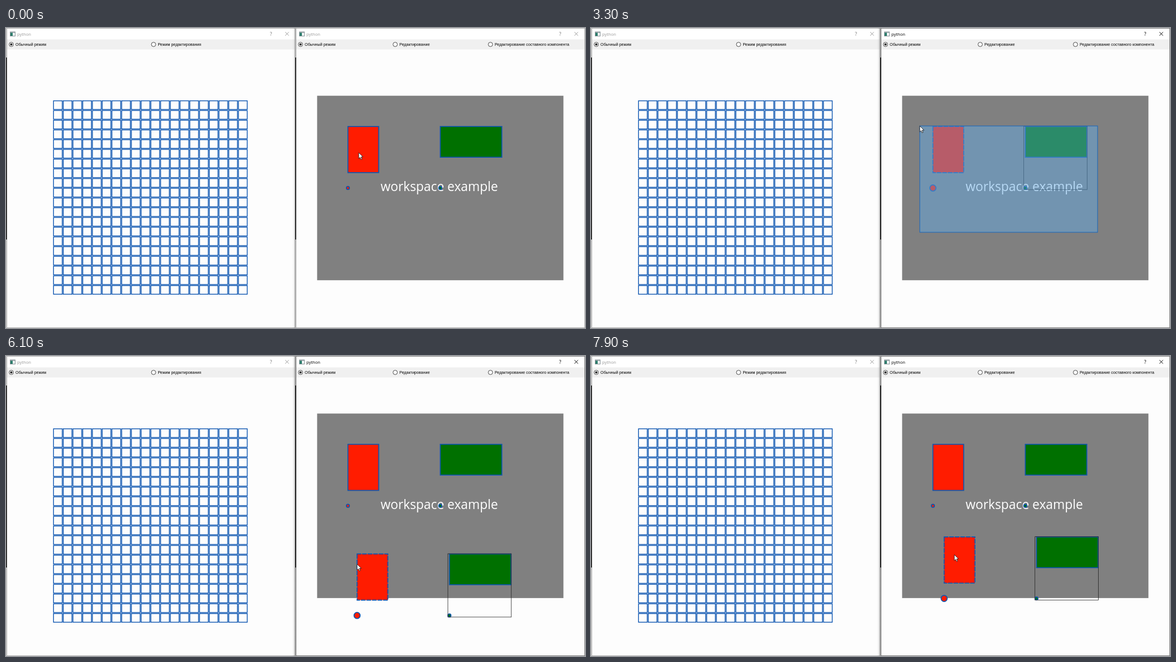
An HTML page with a canvas that plays this animation: 1039 by 539 pixels, repeating every 8 s.

```html
<!DOCTYPE html>
<html lang="ru">
<head>
<meta charset="utf-8">
<title>Workspace example</title>
<style>
html, body { margin: 0; width: 100%; height: 100%; overflow: hidden; background: #fff; }
canvas { display: block; }
</style>
</head>
<body>
<canvas id="stage" width="1039" height="539"></canvas>
<script>
const ctx = document.getElementById('stage').getContext('2d');
const LOOP = 8000, STEP = 100, LAG = 40;
const BLUE = '#0d55b0', RED = '#ff1c00', GREEN = '#007000';
const TITLE = '"Open Sans", "Noto Sans", sans-serif';
const LABEL = '7.15px "Liberation Sans", Arial, sans-serif';

// The scene is 800 x 600 units, shown at this scale and place
const SCALE = 0.5525, LEFT = 558.3, TOP = 121.7, SCROLL = -18.3;
const UNIT = 100 * SCALE;

// Times of the user's actions
const PRESS = 2200, PICK_GREEN = 2500, PICK_RED = 2700, RELEASE = 3400;
const CLEAR = 5300, PASTE = 6100, GRAB = 6500;

// Pointer moves: start, end, and the place reached; it rests in between
const START = [633, 224];
const moves = [
  [500, 1000, 849, 338],
  [1300, 1900, 909, 367],
  [2100, 2600, 671, 226],
  [2600, 3200, 590, 176],
  [3400, 3700, 644, 226],
  [4700, 5200, 630, 349],
  [5600, 5900, 630, 374],
  [PASTE, GRAB, 650.5, 385],
  [GRAB, 6800, 660, 377],
  [6800, 7700, 663, 344],
  [7700, 7900, 652, 357]
];

function pointer(t) {
  let [x, y] = START;
  for (const [from, to, endX, endY] of moves) {
    const k = Math.min(1, Math.max(0, (t - from) / (to - from)));
    x += (endX - x) * k;
    y += (endY - y) * k;
  }
  return [x, y];
}

function pastedAt(t) {
  const [x0, y0] = pointer(PASTE);
  const [gx, gy] = pointer(GRAB);
  const [x, y] = pointer(Math.max(GRAB, t - LAG));
  return [x0 + x - gx, y0 + SCROLL + y - gy];
}

function fill(x, y, w, h, color) {
  ctx.fillStyle = color;
  ctx.fillRect(x, y, w, h);
}

function stroke(x, y, w, h, color, width) {
  ctx.strokeStyle = color;
  ctx.lineWidth = width;
  ctx.strokeRect(x, y, w, h);
}

function disc(x, y, r, color, edge, width) {
  ctx.beginPath();
  ctx.arc(x, y, r, 0, 2 * Math.PI);
  ctx.fillStyle = color;
  ctx.fill();
  if (!edge) return;
  ctx.strokeStyle = edge;
  ctx.lineWidth = width;
  ctx.stroke();
}

function label(str, x, y, font, color, align = 'left') {
  ctx.font = font;
  ctx.fillStyle = color;
  ctx.textAlign = align;
  ctx.fillText(str, x, y);
}

function radio(x, text, on) {
  disc(x, 29.5, 3.9, '#fff', '#333', 0.9);
  if (on) disc(x, 29.5, 2.1, '#222');
  label(text, x + 7.6, 32.2, LABEL, '#000');
}

function cross(x, y, r, color) {
  ctx.strokeStyle = color;
  ctx.lineWidth = 1;
  ctx.beginPath();
  for (const d of [r, -r]) {
    ctx.moveTo(x - r, y - d);
    ctx.lineTo(x + r, y + d);
  }
  ctx.stroke();
}

function frameWindow(x, w, active) {
  const ink = active ? '#000' : '#999';
  fill(x, 0, w, 539, '#fdfdfd');
  fill(x, 0, w, 21, '#fff');
  fill(x, 20.5, w, 18, '#f0f0f0');
  stroke(x + 0.5, 0.5, w - 1, 538, active ? '#777' : '#aaa', 1);
  fill(x + 6, 6.5, 10, 8.5, '#8a9499');
  fill(x + 7, 8.5, 8, 5.5, '#f4f8f8');
  fill(x + 7, 8.5, 4, 5.5, '#2c7d6c');
  label('python', x + 19, 13.7, '7.6px ' + TITLE, ink);
  label('?', x + 474.5, 14, '9px ' + TITLE, active ? '#000' : '#777', 'center');
  cross(x + 503.3, 10.5, 3.2, ink);
}

function grid() {
  const pitch = 17.47, side = 15.6;
  for (let row = 0; row < 20; row++)
    for (let col = 0; col < 20; col++)
      stroke(85.3 + col * pitch, 130.8 + row * pitch, side, side, BLUE, 1.4);
}

function item(x, y, cols, rows, color, dashed) {
  const w = cols * UNIT, h = rows * UNIT, pen = 3 * SCALE;
  fill(x, y, w, h, color);
  ctx.lineCap = 'square';
  if (dashed) ctx.setLineDash([4 * pen, 2 * pen]);
  stroke(x, y, w, h, BLUE, pen);
  ctx.setLineDash([]);
  ctx.lineCap = 'butt';
  disc(x, y + 2 * UNIT, (dashed ? 10 : 5) * SCALE, color, BLUE, pen);
}

function pair(x, y, redPicked, greenPicked) {
  const gx = x + 3 * UNIT;
  item(x, y, 1, 1.5, RED, redPicked);
  item(gx, y, 2, 1, GREEN, false);
  if (greenPicked) stroke(gx - 2.8, y - 0.5, 2 * UNIT + 3.3, 2 * UNIT + 3.3, '#222', 0.8);
}

function workspace(t) {
  const top = TOP + (t >= PASTE ? SCROLL : 0);
  const picked = t >= PRESS && t < CLEAR;
  fill(LEFT, top, 8 * UNIT, 6 * UNIT, '#808080');
  label('workspace example', 777.5, top + 171.6, '22.8px ' + TITLE, '#fff', 'center');
  pair(LEFT + UNIT, top + UNIT, picked && t >= PICK_RED, picked && t >= PICK_GREEN);
  if (t >= PASTE) pair(...pastedAt(t), true, true);
}

function rubberBand(t) {
  if (t < PRESS || t >= RELEASE) return;
  const [right, bottom] = pointer(PRESS - STEP);
  const [x, y] = pointer(t - LAG);
  fill(x, y, right - x, bottom - y, 'rgba(97,170,232,.45)');
  stroke(x, y, right - x, bottom - y, '#1464bc', 1);
}

function arrow(x, y) {
  const outline = [[0, 0], [0, 10.6], [2.4, 8.4], [4.1, 12.2], [5.9, 11.4], [4.2, 7.7], [7.6, 7.6]];
  ctx.beginPath();
  for (const [dx, dy] of outline) ctx.lineTo(x + dx, y + dy);
  ctx.closePath();
  ctx.fillStyle = '#fff';
  ctx.fill();
  ctx.strokeStyle = '#111';
  ctx.lineWidth = 0.8;
  ctx.stroke();
}

function draw(t) {
  const active = t >= PRESS;
  fill(0, 0, 1039, 539, '#d8d8d8');
  frameWindow(1, 518, false);
  radio(9.5, 'Обычный режим', true);
  radio(264.8, 'Режим редактирования', false);
  grid();

  const shade = ctx.createLinearGradient(514, 0, 520, 0);
  shade.addColorStop(0, 'rgba(0,0,0,0)');
  shade.addColorStop(1, active ? 'rgba(0,0,0,.2)' : 'rgba(0,0,0,.12)');
  fill(514, 0, 6, 539, shade);

  frameWindow(520, 519, active);
  for (const x of [0, 519]) fill(x, 53, 1.5, 327, '#111');
  radio(528.5, 'Обычный режим', true);
  radio(698.4, 'Редактирование', false);
  radio(869.3, 'Редактирование составного компонента', false);

  workspace(t);
  rubberBand(t);
  arrow(...pointer(t));
}

function tick() {
  const t = performance.now() % LOOP;
  draw(Math.floor(t / STEP) * STEP);
  requestAnimationFrame(tick);
}
tick();
</script>
</body>
</html>
```
